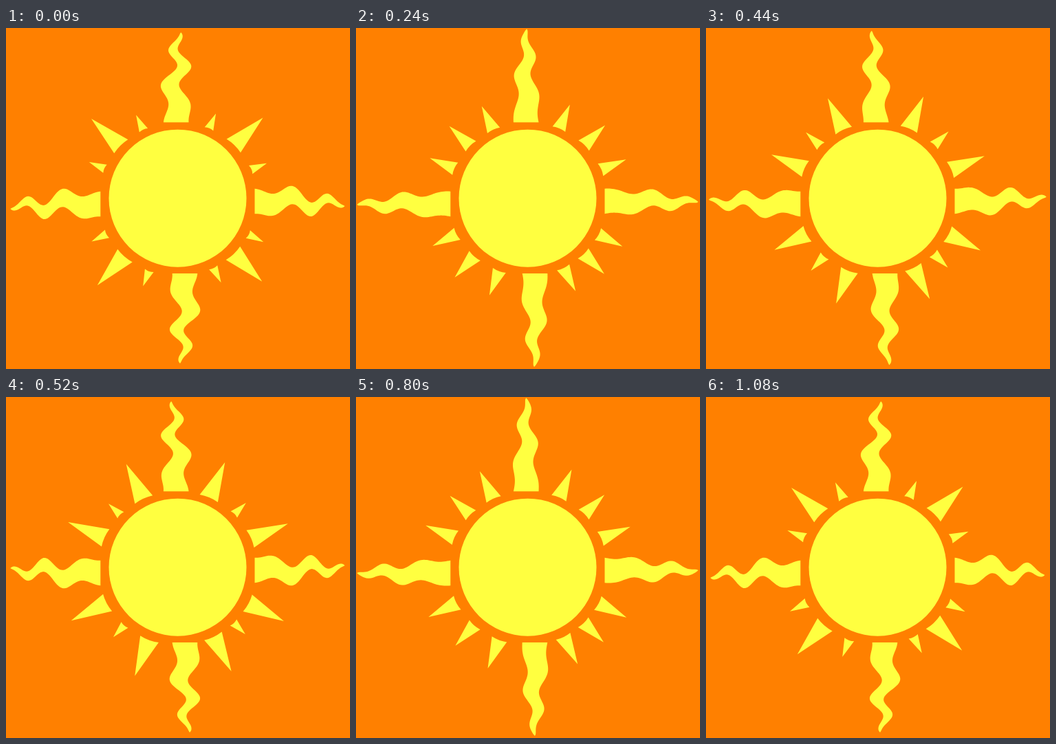
Write an HTML page with a canvas that moves like this. It is 500 px wide and 496 px high and loops after 1120 ms.

```html
<!DOCTYPE html>
<html>
<head>
<meta charset="utf-8">
<title>Sun</title>
<style>
  html, body { margin: 0; height: 100%; overflow: hidden; background: #ff8000; }
  canvas { display: block; }
</style>
</head>
<body>
<canvas id="stage" width="500" height="496"></canvas>
<script>
const ctx = document.getElementById('stage').getContext('2d');
const LOOP = 1120, STEP = 40, TURN = 520;
const ORANGE = '#ff8000', YELLOW = '#ffff40';
const { PI, sin, cos, min, abs, floor } = Math;

// Canvas transforms for the top, right, bottom and left flames.
const flamePlaces = [
  [1, 0, 0, -1, 247.2, 137.3],
  [0, 1, 1, 0, 361.5, 252],
  [-1, 0, 0, 1, 260, 357],
  [0, 1, -1, 0, 137.3, 256]
];

// Each corner: the clockwise angle of its middle spike and the spread to its neighbours.
const corners = [[45.3, 22], [135.3, 18], [222, 21], [314, 20.5]];

const mix = (a, b, k) => a + (b - a) * k;

// A point on the slightly flattened ring around the sun, 0 degrees being up.
function onRing(degrees, r) {
  const a = degrees * PI / 180;
  return [249.5 + 1.02 * r * sin(a), 249 - .985 * r * cos(a)];
}

function drawSpike(angle, size) {
  const base = 113, half = mix(3.3, 7.2, size);
  ctx.beginPath();
  ctx.moveTo(...onRing(angle, mix(137, 171, size)));
  ctx.lineTo(...onRing(angle - half, base));
  ctx.quadraticCurveTo(...onRing(angle, base * 1.02), ...onRing(angle + half, base));
  ctx.fill();
}

// A tapering strip bent by a wave that travels half a wavelength outward per swing.
// It flattens and stretches in mid-swing while the tip leans to the other side.
function flamePath(u, side) {
  const travel = u * u * (3 - 2 * u);
  const flat = sin(PI * u);
  const length = 131 + 5 * flat;
  const centre = s => side * (
    10.5 * sin(2.9 * s) * (1 - .45 * flat) * sin(PI * (3.1 * s + 1.4 * s * s - travel)) +
    4.5 * s * s * cos(PI * travel));
  const width = s => 18.3 * (1 - s) ** .6;

  const path = new Path2D();
  const n = 60;
  for (let i = -n; i <= n; i++) {
    const s = 1 - abs(i) / n;
    path.lineTo(centre(s) + Math.sign(i) * width(s), s * length);
  }
  // The loop runs tip-outward on both edges, so it starts and ends at the base.
  path.closePath();
  return path;
}

function draw(t) {
  // 0..1 is the first swing, 1..2 the mirrored one
  const swing = t < TURN ? t / TURN : 1 + (t - TURN) / (LOOP / 2);
  const side = floor(swing) % 2 ? -1 : 1;

  ctx.setTransform(1, 0, 0, 1, 0, 0);
  ctx.fillStyle = ORANGE;
  ctx.fillRect(0, 0, 500, 496);
  ctx.fillStyle = YELLOW;

  ctx.beginPath();
  ctx.arc(249.5, 247.7, 100, 0, PI * 2);
  ctx.fill();

  // Side spikes grow while the middle ones shrink, slightly later.
  const late = (t + LOOP - 10) % LOOP;
  const sideSize = min(late, LOOP - late) / TURN;
  const middleSize = abs(1 - swing);
  for (const [angle, spread] of corners) {
    drawSpike(angle, middleSize);
    drawSpike(angle - spread, sideSize);
    drawSpike(angle + spread, sideSize);
  }

  const flame = flamePath(swing % 1, side);
  for (const place of flamePlaces) {
    ctx.setTransform(...place);
    ctx.fill(flame);
  }
}

const start = performance.now();
function tick() {
  const t = (performance.now() - start) % LOOP;
  draw(floor(t / STEP) * STEP);
  requestAnimationFrame(tick);
}
tick();
</script>
</body>
</html>
```
